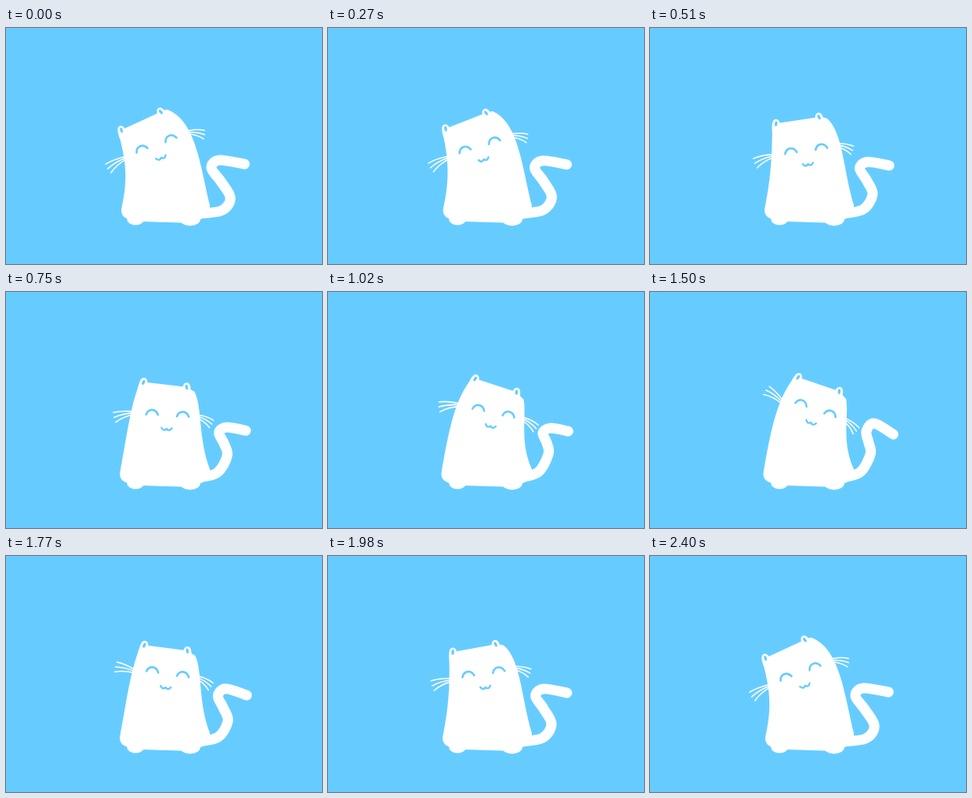
An HTML page with a canvas for the animation above (2.43 s loop, 400 by 300 pixels).

```html
<!DOCTYPE html>
<html lang="en">
<head>
<meta charset="utf-8">
<title>Swaying cat</title>
<style>
html, body { margin: 0; width: 100%; height: 100%; overflow: hidden; background: #66ccff; }
canvas { display: block; width: 400px; height: 300px; }
</style>
</head>
<body>
<canvas id="stage" width="400" height="300"></canvas>
<script>
const LOOP = 2430;
const BLUE = '#66ccff';
const WHITE = '#fff';
const ctx = document.getElementById('stage').getContext('2d');

// Smooth step from 0 to 1 over a stretch of the loop.
function ease(t, from, length) {
  const u = Math.max(0, Math.min(1, (t - from) / length));
  return u * u * (3 - 2 * u);
}

const swayOut = t => ease(t, 90, 1020);
const sway = t => swayOut(t) - ease(t, 1520, 750);
const perk = t => ease(t, 1050, 450) - ease(t, 1520, 600);
const nod = t => 6 * Math.sin(Math.PI * swayOut(t));

const lerp = (a, b, p) => a + (b - a) * p;
const between = (a, b, p) => a.map((v, i) => lerp(v, b[i], p));

// Position and angle: from the left lean to the right lean, plus the perk-up.
function pose(left, right, lift, p, q, dy) {
  const [x, y, a] = between(left, right, p).map((v, i) => v + lift[i] * q);
  return { x, y: y + dy, a: a * Math.PI / 180 };
}

function place(p, [x, y]) {
  const c = Math.cos(p.a), s = Math.sin(p.a);
  return [p.x + x * c - y * s, p.y + x * s + y * c];
}

function within(p, dir, paint) {
  ctx.save();
  ctx.translate(p.x, p.y);
  ctx.rotate(p.a);
  ctx.scale(dir, 1);
  paint();
  ctx.restore();
}

function oval(x, y, rx, ry, turn = 0) {
  ctx.beginPath();
  ctx.ellipse(x, y, rx, ry, turn, 0, 7);
  ctx.fill();
}

function drawTail(p, q) {
  const pts = [
    [243, 236],
    between([273, 232], [266, 229], p),
    between([284, 216], [279, 206], p),
    between([272, 195], [277, 192], p),
    between([260, 178], [272 + 2 * q, 179 - 2 * q], p),
    between([270, 168], [282 + 2 * q, 173 - 6 * q], p),
    between([302, 173], [304 + 4 * q, 177 + 4 * q], p)
  ];
  const last = pts.length - 1;
  const at = i => pts[Math.max(0, Math.min(last, i))];
  ctx.lineWidth = 13;
  ctx.beginPath();
  ctx.moveTo(...pts[0]);
  for (let i = 0; i < last; i++) {
    const a = at(i - 1), b = at(i), c = at(i + 1), d = at(i + 2);
    ctx.bezierCurveTo(
      ...b.map((v, k) => v + (c[k] - a[k]) / 6),
      ...c.map((v, k) => v - (d[k] - b[k]) / 6),
      ...c);
  }
  ctx.stroke();
}

function drawWhiskers(p, dir, length) {
  within(p, dir, () => {
    ctx.lineWidth = 1.6;
    for (const k of [-1, 0, 1]) {
      const a = k * 0.25, y = k * 2;
      const dx = length * Math.cos(a), dy = length * Math.sin(a);
      ctx.beginPath();
      ctx.moveTo(-3, y);
      ctx.quadraticCurveTo(dx * 0.5, y + dy * 0.35 - 2.5, dx, y * 0.4 + dy);
      ctx.stroke();
    }
  });
}

function drawBody(h, p) {
  const cornerL = place(h, between([-34, 15], [-33, 9], p));
  const cornerR = place(h, between([35.5, 5], [39, 11], p));
  ctx.beginPath();
  ctx.moveTo(...cornerL);
  ctx.lineTo(...place(h, [-27, 4.5]));
  ctx.lineTo(...place(h, [27, 4.5]));
  ctx.lineTo(...cornerR);
  ctx.bezierCurveTo(
    ...between([240, 116], [252, 158], p),
    ...between([246, 175], [242, 190], p), 258, 225);
  ctx.quadraticCurveTo(258, 240, 244, 244);
  ctx.lineTo(222, 247.5);
  ctx.lineTo(172, 246);
  ctx.lineTo(157, 243.5);
  const hip = lerp(146, 143.5, p);
  ctx.quadraticCurveTo(hip - 1, 241, hip, 230);
  ctx.bezierCurveTo(
    ...between([155, 192], [152, 180], p),
    ...between([151, 168], [160, 138], p), ...cornerL);
  ctx.fill();
  oval(164, 242.5, 11, 8);
  oval(233, 243, 13, 8.5);
}

function drawEar(h, dir) {
  within(h, dir, () => {
    ctx.fillStyle = WHITE;
    ctx.beginPath();
    ctx.moveTo(-34, 14);
    ctx.bezierCurveTo(-33, 6, -32, -1, -27.5, -1);
    ctx.bezierCurveTo(-23.5, -1, -22.5, 3, -22.5, 6);
    ctx.lineTo(-24, 14);
    ctx.fill();
    ctx.fillStyle = BLUE;
    oval(-27.5, 4.8, 1.7, 3.3, 0.25);
  });
}

function drawFace(p) {
  within(p, 1, () => {
    ctx.strokeStyle = BLUE;
    ctx.lineWidth = 2.6;
    for (const x of [-19.5, 19.5]) {
      ctx.beginPath();
      ctx.moveTo(x - 7.5, 3.5);
      ctx.bezierCurveTo(x - 5, -4.5, x + 4, -5, x + 7.5, 3);
      ctx.stroke();
    }
    ctx.lineWidth = 2.4;
    ctx.beginPath();
    ctx.moveTo(-6.5, 19);
    ctx.quadraticCurveTo(-3.5, 24, 0, 20);
    ctx.quadraticCurveTo(3.5, 24, 6.5, 19);
    ctx.stroke();
  });
}

function draw(t) {
  const p = sway(t), q = perk(t), dip = nod(t);
  const head = pose([169, 114, -25], [215, 114.5, 19], [0, -1.5, 0], p, q, -1.5 * Math.sin(Math.PI * p));
  const face = pose([189.5, 146, -20], [210.5, 150.5, 13], [0, -3.5, 7], p, q, dip);
  const left = pose([148, 167, -32], [163, 143, -5], [2, -5, 41], p, q, dip);
  const right = pose([233, 133, 8], [249, 163, 37], [-1, 1, 7], p, q, dip);

  ctx.fillStyle = BLUE;
  ctx.fillRect(0, 0, 400, 300);
  ctx.fillStyle = ctx.strokeStyle = WHITE;
  ctx.lineCap = ctx.lineJoin = 'round';
  drawTail(sway(t + 60), q);
  drawWhiskers(left, -1, 22.5);
  drawWhiskers(right, 1, 18.5);
  drawBody(head, p);
  drawEar(head, 1);
  drawEar(head, -1);
  drawFace(face);
}

const start = performance.now();
function tick() {
  draw((performance.now() - start) % LOOP);
  requestAnimationFrame(tick);
}
tick();
</script>
</body>
</html>
```
